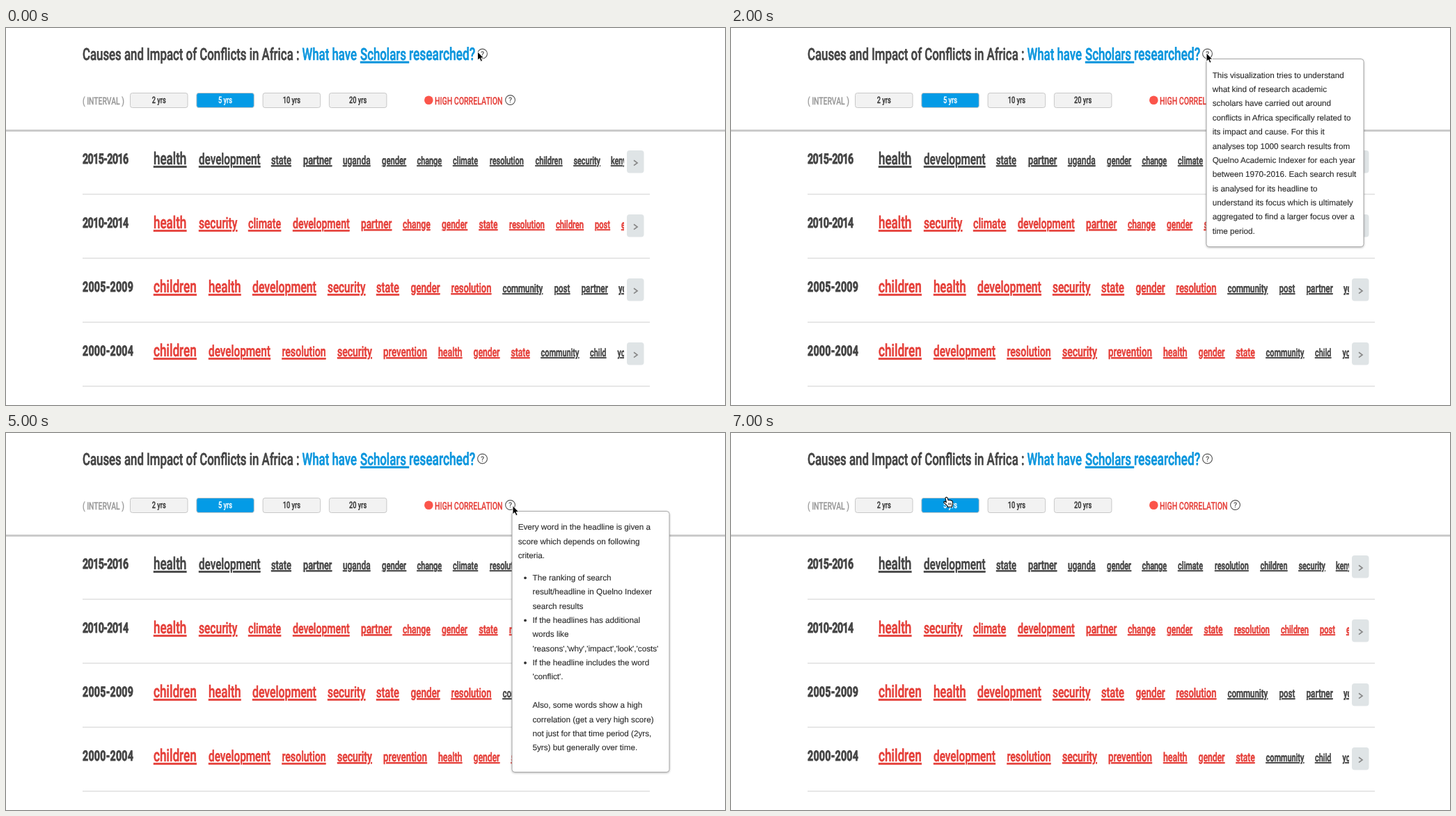
An HTML page that plays this animation: 1033 by 542 pixels, repeating every 8 s.

```html
<!DOCTYPE html>
<html lang="en">
<head>
<meta charset="utf-8">
<title>Research keywords</title>
<style>
html, body { margin: 0; height: 100%; overflow: hidden; background: #fff; }
svg { display: block; width: 100vw; height: 100vh; }
text { white-space: pre; fill: currentColor; text-rendering: geometricPrecision; }
.narrow { font-family: Roboto, sans-serif; font-weight: 500; stroke: currentColor; stroke-width: .65px; }
.bold { font-weight: 700; stroke-width: .9px; }
.light { stroke-width: .25px; }
.under { text-decoration: underline; text-decoration-thickness: .8px; text-decoration-skip-ink: none; }
.mid { text-anchor: middle; }
.note { font: 11.7px "Liberation Sans", Arial, sans-serif; color: #2b2b2b; stroke: currentColor; stroke-width: .12px; }
.box { fill: #fff; stroke: #a9a9a9; filter: drop-shadow(0 1px 1.5px #0004); }
</style>
</head>
<body>
<svg id="stage" viewBox="0 0 1033 542">
  <clipPath id="clip"><rect width="888" height="542"/></clipPath>
  <g id="page"></g>
  <g id="tips"></g>
  <path id="arrow" d="M0 0V12.3L2.8 9.8 4.8 14.2 7 13.2 5 9H8.8Z" fill="#000" stroke="#fff" stroke-width=".9"/>
  <g id="hand" fill="#fff" stroke="#000" stroke-width="1.1" stroke-linejoin="round">
    <path d="M3 2.6Q3 .8 4.6 .9 5.8 1 6.2 2.4L7.1 5.2Q8.4 4.3 9.3 5.3 10.6 4.6 11.3 5.8 12.8 5.4 13.2 7L13.7 10Q13.6 11.6 12.6 12.8V14.8H6V13.4L1 8.6Q.3 7 2 6.8L4.4 8.2Z"/>
    <path d="M7.6 9V12M9.4 9V12M11.2 9V12" stroke-width=".8"/>
  </g>
</svg>
<script>
const DARK = "#444", RED = "#e53f39", BLUE = "#0a95dd";
const NARROW = 0.7, LINE = 20.37;
const $ = id => document.getElementById(id);

const narrow = (x, y, size, str, color = DARK, cls = "", extra = "") =>
  `<text class="narrow ${cls}" transform="translate(${x} ${y}) scale(${NARROW} 1)" font-size="${size}" color="${color}" ${extra}>${str}</text>`;

const rect = (x, y, w, h, r, attrs) =>
  `<rect x="${x}" y="${y}" width="${w}" height="${h}" rx="${r}" ${attrs}/>`;

const help = (x, y) =>
  `<circle cx="${x}" cy="${y}" r="6.9" fill="#fff" stroke="#555" stroke-width="1.1"/>
   <text class="mid" x="${x}" y="${y + 3.7}" font-family="Roboto, sans-serif" font-size="10.5" font-weight="500" color="#555">?</text>`;

const lines = (x, y, rows) => rows.map((row, i) =>
  `<text class="note" x="${x}" y="${y + i * LINE}">${row}</text>`).join("");

// Years, number of leading red words, then each word as "text x size"
const rows = [
  ["2015-2016", 0, "health 212 24.3,development 277 21.8,state 381 18.2,partner 427 18.1,uganda 484 17,gender 540 16.1,change 590.5 15.5,climate 642 15.5,resolution 695 15.5,children 760.5 15.5,security 815.5 15.4,kenya 869 15.4"],
  ["2010-2014", 12, "health 212 24.3,security 277 22.2,climate 348 20.3,development 412 20.1,partner 510 19.4,change 570 17.3,gender 626 17,state 679.5 17,resolution 723 16.2,children 790 15.9,post 846 15.8,economic 884 15.6"],
  ["2005-2009", 7, "children 212 24.6,health 291 24,development 354 22.6,security 462 21.8,state 532 20.8,gender 581.5 19.3,resolution 639.5 18.4,community 713.5 16.4,post 787.5 16.4,partner 826.5 16.8,young 880 16.4"],
  ["2000-2004", 8, "children 212 24.6,development 291 21.9,resolution 396.5 20.1,security 476 20,prevention 542 19,health 621 17.7,gender 671.5 17.4,state 725.5 17.2,community 768.5 15.6,child 839 15.4,young 878.5 15.4"],
];

const row = ([years, reds, list], i) => {
  const y = 92 * i;
  const words = list.split(",").map((entry, n) => {
    const [word, x, size] = entry.split(" ");
    return narrow(x, 196.3 + y, size, word, n < reds ? RED : DARK, "under");
  }).join("");
  // Narrower figures wherever the years contain a 1
  const spacing = years.includes("1") ? -0.8 : 0.4;
  return narrow(110, 195.2 + y, 20.3, years, DARK, "bold", `letter-spacing="${spacing}"`) +
    `<g clip-path="url(#clip)">${words}</g>` +
    rect(892, 176 + y, 24.5, 32.5, 4, 'fill="#dfe4e6"') +
    `<path d="M902 ${190.2 + y}l5 3.7-5 3.7" fill="none" stroke="#888" stroke-width="1.7"/>` +
    rect(110, 238.5 + y, 815, 1, 0, 'fill="#cfcfcf"');
};

const button = (label, i) => {
  const x = 178.5 + 95.3 * i, on = i === 1;
  return rect(x, 93.5, 82.5, 21, 3, `fill="${on ? "#049be6" : "#f2f2f2"}" stroke="#c8c8c8"`) +
    narrow(x + 41.3, 108.3, 13.2, label, on ? "#fff" : "#333", "mid light");
};

$("page").innerHTML =
  narrow(110, 46, 24, "Causes and Impact of Conflicts in Africa :") +
  narrow(425.5, 46, 24, "What have", BLUE) +
  narrow(509, 46, 24, "Scholars ", BLUE, "under") +
  narrow(579, 46, 24.8, "researched?", BLUE) +
  help(684.5, 37) +
  narrow(110, 110.2, 14.8, "( INTERVAL )", "#999", "light") +
  ["2 yrs", "5 yrs", "10 yrs", "20 yrs"].map(button).join("") +
  '<circle cx="607.3" cy="103.8" r="6.3" fill="#fb554b"/>' +
  narrow(616, 109.8, 15.1, "HIGH CORRELATION", RED, "light") +
  help(724.5, 103.5) +
  rect(0, 146, 1033, 3, 0, 'fill="#cbcbcb"') +
  rows.map(row).join("");

const tip = (x, y, h, content) =>
  `<g>${rect(x, y, 226, h, 4, 'class="box"')}${content}</g>`;

$("tips").innerHTML =
  tip(683, 44.5, 270, lines(691.7, 71.7, [
    "This visualization tries to understand",
    "what kind of research academic",
    "scholars have carried out around",
    "conflicts in Africa specifically related to",
    "its impact and cause. For this it",
    "analyses top 1000 search results from",
    "Quelno Academic Indexer for each year",
    "between 1970-2016. Each search result",
    "is analysed for its headline to",
    "understand its focus which is ultimately",
    "aggregated to find a larger focus over a",
    "time period.",
  ])) +
  tip(727, 112.5, 375, lines(735.7, 139.3, [
    "Every word in the headline is given a",
    "score which depends on following",
    "criteria.",
  ]) + lines(756.5, 211.8, [
    "The ranking of search",
    "result/headline in Quelno Indexer",
    "search results",
    "If the headlines has additional",
    "words like",
    "'reasons','why','impact','look','costs'",
    "If the headline includes the word",
    "'conflict'.",
    "",
    "Also, some words show a high",
    "correlation (get a very high score)",
    "not just for that time period (2yrs,",
    "5yrs) but generally over time.",
  ]) + [0, 3, 6].map(n => `<circle cx="746" cy="${208.3 + n * LINE}" r="1.9" fill="#333"/>`).join(""));

// Start time, pointer, its position, and the open note (-1 for none)
const steps = [
  [0, "arrow", 677.5, 34, -1],
  [1000, "arrow", 684, 36, -1],
  [2000, "arrow", 683, 36, 0],
  [4000, "hand", 718, 96, -1],
  [5000, "arrow", 728, 104.5, 1],
  [6000, "arrow", 756.5, 87.5, 1],
  [7000, "hand", 305, 91.5, -1],
];
const tips = [...$("tips").children];
const start = performance.now();

function draw(now) {
  const t = Math.max(0, now - start) % 8000;
  const [, pointer, x, y, open] = steps.filter(s => s[0] <= t).pop();
  for (const id of ["arrow", "hand"]) $(id).style.display = id === pointer ? "" : "none";
  $(pointer).setAttribute("transform", `translate(${x} ${y})`);
  tips.forEach((el, i) => el.style.display = i === open ? "" : "none");
  requestAnimationFrame(draw);
}
draw(start);
</script>
</body>
</html>
```
